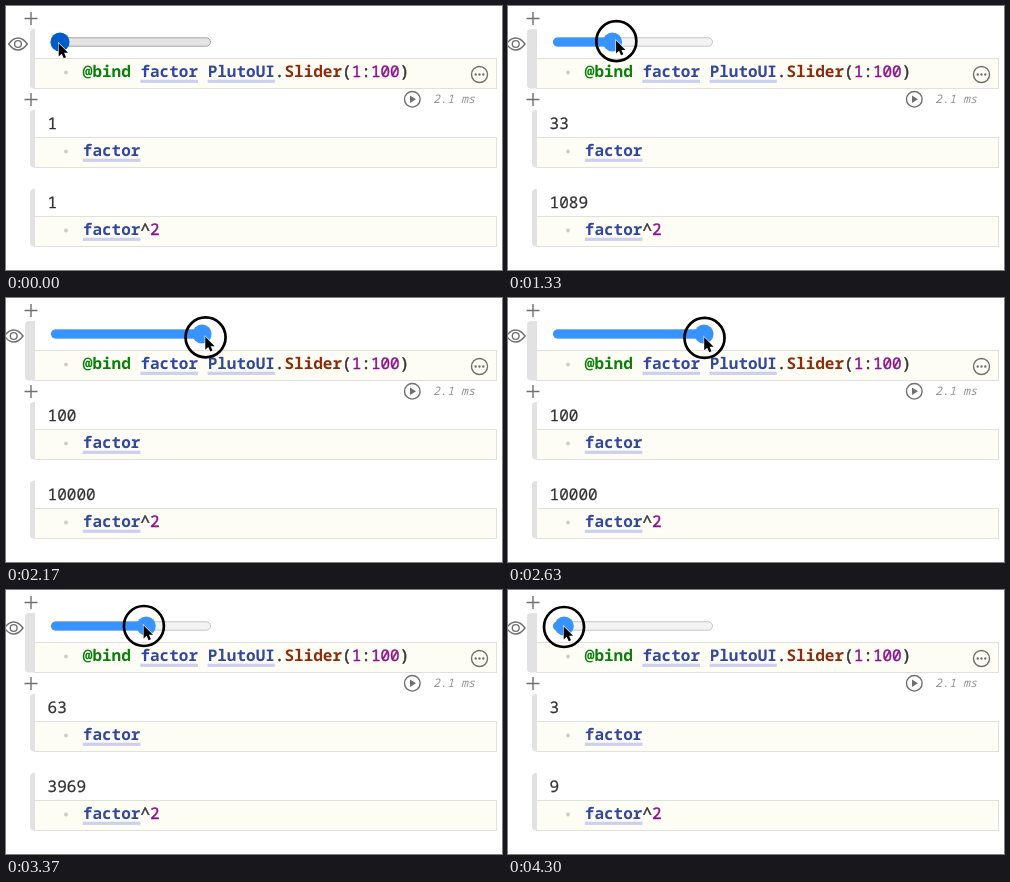
These frames come from a looping animation (496 by 264 pixels, 4.33 s). An HTML page:

```html
<!DOCTYPE html>
<html lang="en">
<head>
<meta charset="utf-8">
<title>Slider binding</title>
<style>
html, body { margin: 0; width: 100%; height: 100%; overflow: hidden; background: #fff; }
svg { display: block; width: 496px; height: 264px; }
text {
  font: 16px "Noto Sans Mono", "DejaVu Sans Mono", monospace;
  white-space: pre; text-rendering: geometricPrecision; fill: #333;
}
.out { stroke: #333; stroke-width: .25; }
.code { font-weight: 700; }
.macro { fill: #0a800a; }
.name { fill: #32489f; }
.call { fill: #8c2c0c; }
.num { fill: #8f0f8f; font-weight: 400; stroke: #8f0f8f; stroke-width: .4; }
.op { fill: #333; font-weight: 400; stroke: #333; stroke-width: .5; }
.time { font-size: 11.7px; font-style: italic; fill: #949494; }
.icon { fill: none; stroke: #707070; stroke-width: 1.4; }
.dot { fill: #707070; stroke: none; }
.box { fill: #fdfcf5; stroke: #e0e0dc; }
.bar { fill: #e2e2e2; }
.link { fill: #cccfee; }
</style>
</head>
<body>
<svg viewBox="0 0 496 264">
  <g id="cells"></g>

  <g class="icon">
    <path d="M18.5 12.5h13M25 6v13M18.5 93.5h13M25 87v13"/>
    <circle cx="406.3" cy="93.3" r="7.8"/>
    <path class="dot" d="M404 89.6v7.4l6-3.7z"/>
    <circle cx="473.5" cy="68.5" r="8"/>
    <path d="M469.7 68.5h0m3.8 0h0m3.8 0h0" stroke-width="2.4" stroke-linecap="round"/>
    <g id="eye">
      <path d="M-9.3 0Q-5 -6 0 -6T9.3 0Q5 6 0 6T-9.3 0Z"/>
      <circle r="3.4"/>
    </g>
  </g>
  <text class="time" x="427" y="97">2.1 ms</text>

  <text class="code" x="76.8" y="71"><tspan class="macro">@bind</tspan> <tspan class="name">factor</tspan> <tspan class="name">PlutoUI</tspan><tspan class="op">.</tspan><tspan class="call">Slider</tspan><tspan class="op">(</tspan><tspan class="num">1</tspan><tspan class="op">:</tspan><tspan class="num">100</tspan><tspan class="op">)</tspan></text>
  <text class="code" x="76.8" y="150"><tspan class="name">factor</tspan></text>
  <text class="code" x="76.8" y="229"><tspan class="name">factor</tspan><tspan class="op">^</tspan><tspan class="num">2</tspan></text>
  <text class="out" id="value" x="41.6" y="123"></text>
  <text class="out" id="square" x="41.6" y="202"></text>

  <rect id="track" x="45.5" y="31.8" width="159" height="8.4" rx="4.2"/>
  <rect id="fill" x="45" y="31.4" height="9.2" rx="4.6"/>
  <circle id="thumb" cy="36" r="9.6"/>
  <circle id="ring" r="20" fill="none" stroke="#000" stroke-width="2.7"/>
  <path id="arrow" d="M0 0V13L3 10.3 5 14.8 7.3 13.8 5.4 9.4H9.4Z"
    stroke="#fff" stroke-width="1.4" stroke-opacity=".8" paint-order="stroke"/>
</svg>

<script>
const LOOP = 4330, PRESS = 370;
const THUMB_LAG = 25, VALUE_LAG = 50;
const MIN_X = 54, MAX_X = 196;
const CHAR = 9.6, CODE_X = 76.8;
const $ = id => document.getElementById(id);
const set = (el, attrs) => { for (const k in attrs) el.setAttribute(k, attrs[k]); };
const clamp = (v, lo, hi) => Math.min(hi, Math.max(lo, v));

function add(tag, attrs) {
  const el = document.createElementNS("http://www.w3.org/2000/svg", tag);
  set(el, attrs);
  $("cells").append(el);
  return el;
}

const leftBar = (x, top, bottom) =>
  `M29 ${top}H${x + 4}Q${x} ${top} ${x} ${top + 4}V${bottom - 4}Q${x} ${bottom} ${x + 4} ${bottom}H29Z`;

const underline = (col, chars, y) =>
  add("rect", { class: "link", x: CODE_X + col * CHAR, y, width: chars * CHAR, height: 3.2 });

const bars = [[23, 52], [104, 131], [183, 210]].map(([top, y], i) => {
  add("rect", { class: "box", x: 28.5, y: y + 0.5, width: 462, height: 30 });
  add("circle", { cx: 60, cy: y + 14.5, r: 1.9, fill: "#ccc" });
  underline(i ? 0 : 6, 6, y + 21.7);
  return add("path", { class: "bar", d: leftBar(24, top, y + 30.5) });
});
underline(13, 7, 73.7);

// Pointer path: time, x, y
const path = [
  [110, 53, 38], [230, 54.6, 39], [PRESS, 54.6, 39], [870, 57, 38.5], [970, 62, 38],
  [1400, 119, 35], [1630, 160, 38], [1930, 208, 38], [2320, 195.5, 40], [2600, 197, 40],
  [2930, 169.4, 38], [3370, 138, 36], [3530, 116, 35], [4070, 67, 35.5], [4300, 56, 37]
];

// Smooth curve through one column of the path, flat at turning points
function curve(col) {
  const last = path.length - 1;
  const rate = i => (path[i + 1][col] - path[i][col]) / (path[i + 1][0] - path[i][0]);
  const slope = path.map((_, i) => {
    if (!i || i === last) return 0;
    const a = rate(i - 1), b = rate(i);
    return a * b > 0 ? 2 * a * b / (a + b) : 0;
  });
  return time => {
    const t = clamp(time, path[0][0], path[last][0]);
    const i = Math.max(1, path.findIndex(p => p[0] >= t)) - 1;
    const a = path[i], b = path[i + 1];
    const h = b[0] - a[0], u = (t - a[0]) / h, w = 1 - u;
    return w * w * ((1 + 2 * u) * a[col] + u * h * slope[i])
         + u * u * ((1 + 2 * w) * b[col] - w * h * slope[i + 1]);
  };
}
const mouseX = curve(1), mouseY = curve(2);
const thumbAt = t => clamp(mouseX(t), MIN_X, MAX_X);

function draw(t) {
  const down = t >= PRESS;
  const x = mouseX(t), y = mouseY(t), knob = thumbAt(t - THUMB_LAG);
  const s = clamp((t - PRESS) / 200, 0, 1), shift = s * s * (3 - 2 * s);
  const blue = down ? "#3793ff" : "#005cc8";
  const n = Math.round(1 + 99 * (thumbAt(t - VALUE_LAG) - MIN_X) / (MAX_X - MIN_X));

  set(bars[0], { d: leftBar(24 - 5 * shift, 23, 82.5) });
  set($("eye"), { transform: `translate(${12 - 4.3 * shift} 38)` });
  set($("track"), down ? { fill: "#f3f3f3", stroke: "#c4c4c4" } : { fill: "#e4e4e4", stroke: "#a6a6a6" });
  set($("fill"), { width: knob - 45, fill: blue });
  set($("thumb"), { cx: knob, fill: blue });
  set($("ring"), { cx: x, cy: y, visibility: down ? "visible" : "hidden" });
  set($("arrow"), { transform: `translate(${x - 0.3} ${y - 0.6})` });
  $("value").textContent = n;
  $("square").textContent = n * n;
}

const start = performance.now();
function tick() {
  draw((performance.now() - start) % LOOP);
  requestAnimationFrame(tick);
}
tick();
</script>
</body>
</html>
```
